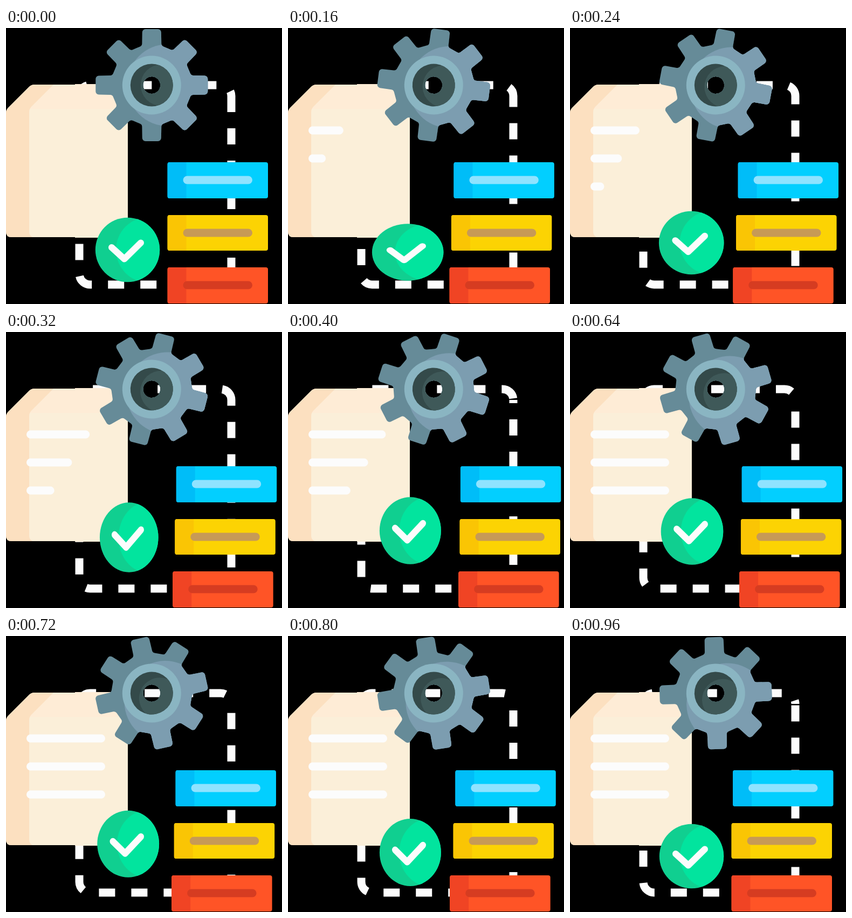
An HTML page with a canvas for the animation above (1 s loop, 512 px wide and 512 px high).

```html
<!DOCTYPE html>
<html lang="en">
<head>
<meta charset="utf-8">
<title>File sorting loop</title>
<style>
html, body { margin: 0; height: 100%; overflow: hidden; background: #000; }
canvas { display: block; width: 100vw; height: 100vh; }
</style>
</head>
<body>
<canvas id="stage" width="512" height="512"></canvas>
<script>
const ctx = document.getElementById('stage').getContext('2d');
const LOOP = 1000, STEP = 40, LAG = 8;
const WHITE = '#fcfcfc';

const clamp = (v, lo = 0, hi = 1) => Math.min(hi, Math.max(lo, v));

function fill(path, color, rule = 'nonzero') {
  ctx.fillStyle = color;
  ctx.fill(path, rule);
}

function disc(x, y, r, color) {
  const p = new Path2D();
  p.arc(x, y, r, 0, Math.PI * 2);
  if (color) fill(p, color);
  return p;
}

function line(points, width, color) {
  ctx.lineWidth = width;
  ctx.strokeStyle = color;
  ctx.lineCap = ctx.lineJoin = 'round';
  ctx.beginPath();
  points.forEach(([x, y]) => ctx.lineTo(x, y));
  ctx.stroke();
}

// Dashed track: starts at the upper right and runs clockwise
const track = new Path2D();
track.moveTo(418, 126);
track.lineTo(418, 456);
track.arc(398, 456, 20, 0, Math.PI / 2);
track.lineTo(156, 476);
track.arc(156, 456, 20, Math.PI / 2, Math.PI);
track.lineTo(136, 126);
track.arc(156, 126, 20, Math.PI, Math.PI * 1.5);
track.lineTo(398, 106);
track.arc(398, 126, 20, -Math.PI / 2, 0);

function drawTrack(t) {
  ctx.save();
  ctx.lineWidth = 15;
  ctx.lineCap = 'butt';
  ctx.strokeStyle = WHITE;
  ctx.setLineDash([30, 30]);
  ctx.lineDashOffset = 60 * t / LOOP;
  ctx.stroke(track);
  ctx.restore();
}

const page = new Path2D('M0 158Q0 152 4 148L43 109Q47 105 53 105H128V104H226V389H128V388H10Q0 388 0 378Z');
const pageTop = new Path2D('M43 150L88 105H128V104H195L226 150Z');
const pageSide = new Path2D('M0 158Q0 152 4 148L43 109Q47 105 53 105H88L47 146Q43 150 43 156V378Q43 385 49 388H10Q0 388 0 378Z');

function drawPage(t) {
  fill(page, '#fbefd9');
  fill(pageTop, '#feecd6');
  fill(pageSide, '#fce0c0');
  [190, 242, 294].forEach((y, i) => {
    const len = 131 * clamp((t - LAG - i * 100) / 400);
    if (len > 0) line([[45.5, y], [45.5 + len, y]], 15, WHITE);
  });
}

function drawDrawer(y, h, delay, t, main, side, handle) {
  const half = LOOP / 2;
  const x = 26 * clamp(1 - Math.abs(t - LAG - half) / (half - delay));
  ctx.save();
  ctx.translate(299.5 + x, y);
  const box = new Path2D();
  box.roundRect(0, 0, 186.5, h, 4);
  fill(box, main);
  ctx.clip(box);
  ctx.fillStyle = side;
  ctx.fillRect(0, 0, 35, h);
  ctx.restore();
  line([[336 + x, y + 33], [449.5 + x, y + 33]], 15, handle);
}

function gearPath() {
  const p = new Path2D();
  const pts = [];
  const spin = (x, y, a) => [x * Math.cos(a) - y * Math.sin(a), x * Math.sin(a) + y * Math.cos(a)];
  for (let k = 0; k < 8; k++) {
    for (const [x, y, r] of [[-18, -73, 6], [-17.5, -104, 6], [17.5, -104, 6], [18, -73, 6]]) {
      pts.push([...spin(x, y, k * Math.PI / 4), r]);
    }
  }
  p.moveTo(...spin(0, -74.3, -Math.PI / 8));
  pts.forEach(([x, y, r], i) => {
    const next = i < pts.length - 1 ? pts[i + 1] : spin(0, -74.3, -Math.PI / 8);
    p.arcTo(x, y, next[0], next[1], r);
  });
  p.closePath();
  return p;
}

const gear = gearPath();
const hole = new Path2D();
hole.rect(-120, -120, 240, 240);
hole.arc(0, 0, 16, 0, Math.PI * 2);

function drawGear(t) {
  ctx.save();
  ctx.translate(270.3, 106);
  ctx.rotate(Math.PI / 4 * t / LOOP);
  ctx.clip(hole, 'evenodd');

  fill(gear, '#668b98');
  ctx.save();
  ctx.clip(gear);
  disc(30, 0, 76, '#7c9db0');
  ctx.fillRect(18, -110, 100, 220);
  ctx.restore();

  disc(0, 0, 54.5, '#8ab5c2');
  const hub = disc(0, 0, 39.5, '#344a4a');
  ctx.clip(hub);
  disc(18, 0, 38.5, '#3f5959');
  ctx.restore();
}

// time, scale x, scale y, centre y
const hop = [
  [0, 1, 1, 411.5],
  [160, 1.11, 0.885, 416],
  [320, 0.91, 1.085, 381],
  [480, 1, 1, 356],
  [500, 1, 1, 354.8],
  [640, 0.968, 1.035, 370],
  [800, 0.955, 1.045, 401.5],
  [960, 1, 1, 408.5],
  [1000, 1, 1, 411.5]
];

function hopAt(t) {
  const i = hop.findIndex(k => k[0] > t);
  const a = hop[i - 1], b = hop[i];
  const u = (t - a[0]) / (b[0] - a[0]);
  return a.map((v, j) => v + (b[j] - v) * u);
}

function drawBadge(t) {
  const [, sx, sy, cy] = hopAt(t);
  ctx.save();
  ctx.translate(256, cy);
  ctx.scale(sx, sy);
  ctx.translate(-30.5, 0);
  const body = disc(0, 0, 59.7, '#10cf90');
  ctx.save();
  ctx.clip(body);
  disc(39.5, 0, 61, '#02e49e');
  ctx.restore();
  line([[-29.5, -4.5], [-6, 17], [24.5, -13]], 12, WHITE);
  ctx.restore();
}

function draw(t) {
  ctx.fillStyle = '#000';
  ctx.fillRect(0, 0, 512, 512);
  drawTrack(t);
  drawPage(t);
  drawDrawer(249, 67, 0, t, '#02cfff', '#00bdf8', '#8fe3ff');
  drawDrawer(347, 66, 100, t, '#fcd303', '#fac504', '#c79a56');
  drawDrawer(444, 67, 200, t, '#ff5426', '#f04424', '#d63c21');
  drawGear(t);
  drawBadge(t);
}

const start = performance.now();
function tick() {
  const t = (performance.now() - start) % LOOP;
  draw(Math.floor(t / STEP) * STEP);
  requestAnimationFrame(tick);
}
tick();
</script>
</body>
</html>
```
